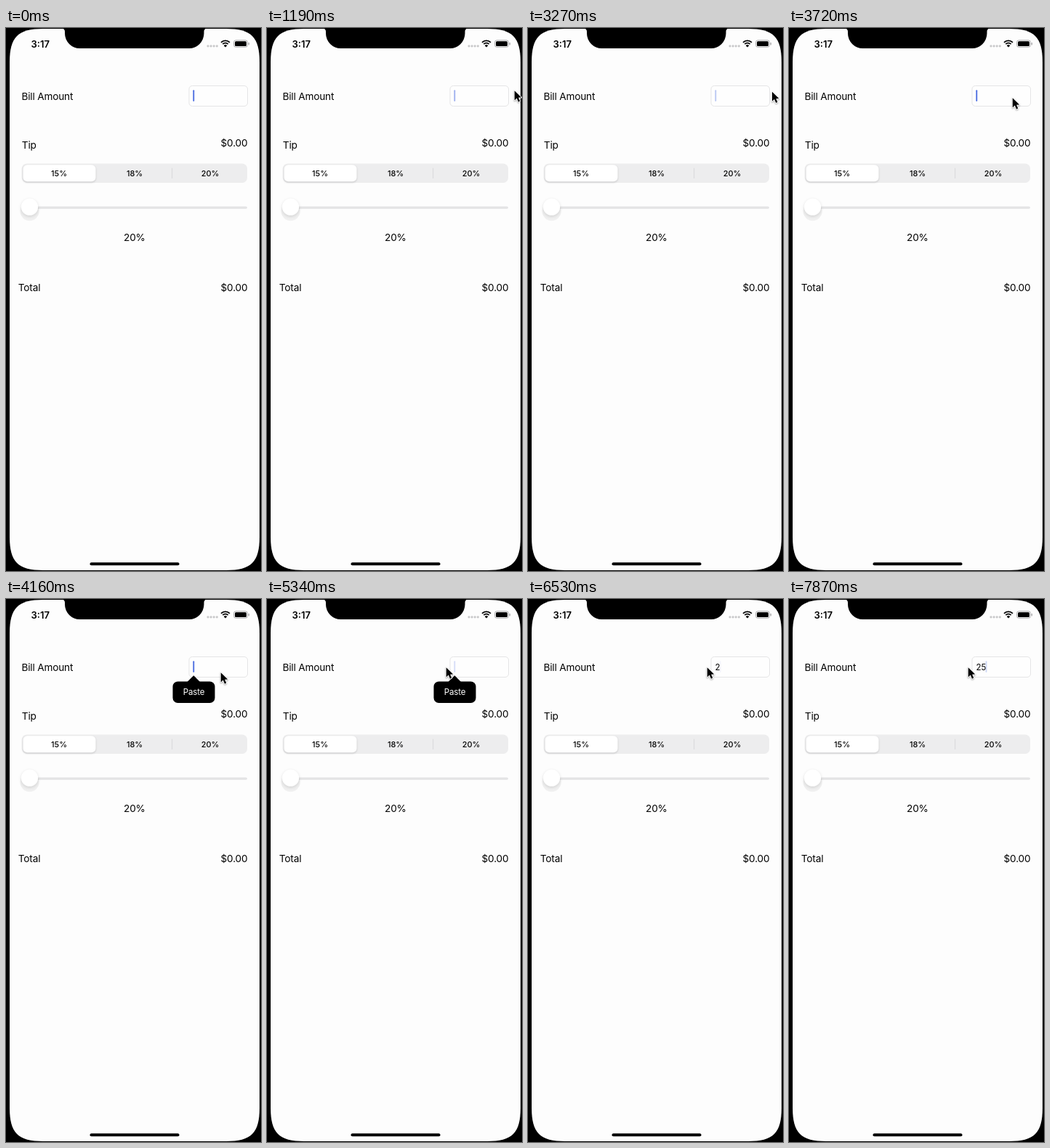
These frames come from a looping animation (351 by 747 pixels, 8000 ms). An HTML page with a canvas:

```html
<!DOCTYPE html>
<html lang="en">
<head>
<meta charset="utf-8">
<title>Tip calculator</title>
<style>
html, body { margin: 0; width: 100%; height: 100%; overflow: hidden; background: #000; }
canvas { display: block; width: 351px; height: 747px; }
</style>
</head>
<body>
<canvas id="stage"></canvas>
<script>
const W = 351, H = 747, LOOP = 8000;
const TICK = 148.3;
const MENU_OPEN = 3940, MENU_CLOSE = 5870;
const KEYS = [{ time: 5860, text: '2' }, { time: 7260, text: '25' }];
const BLINK = { period: 1015, hold: 500, firstFade: 152 };
const POINTER_SHOWN = 590;
const POINTER_START = { x: 340, y: 86 };
const MOVES = [
  { from: 3120, to: 3720, x: 307, y: 96 },
  { from: 3870, to: 4160, x: 295, y: 101 },
  { from: 4600, to: 5190, x: 246, y: 94 }
];

const canvas = document.getElementById('stage');
const ctx = canvas.getContext('2d');
const ratio = window.devicePixelRatio || 1;
canvas.width = W * ratio;
canvas.height = H * ratio;

const clamp = v => Math.min(1, Math.max(0, v));
const progress = (time, from, to) => clamp((time - from) / (to - from));
const smooth = p => p * p * (3 - 2 * p);

function box(x, y, w, h, r, fill) {
  ctx.beginPath();
  ctx.roundRect(x, y, w, h, r);
  ctx.fillStyle = fill;
  ctx.fill();
}

function disc(x, y, r, fill) {
  ctx.beginPath();
  ctx.arc(x, y, r, 0, Math.PI * 2);
  ctx.fillStyle = fill;
  ctx.fill();
}

function shadow(color, blur, dy) {
  ctx.shadowColor = color;
  ctx.shadowBlur = blur * ratio;
  ctx.shadowOffsetY = dy * ratio;
}

function label(text, x, y, { size = 13.6, weight = 400, align = 'left', color = '#000', spacing = -.012 } = {}) {
  ctx.font = `${weight} ${size}px Inter, sans-serif`;
  ctx.letterSpacing = `${size * spacing}px`;
  ctx.textAlign = align;
  ctx.fillStyle = color;
  ctx.fillText(text, x, y);
}

function polygon(points) {
  ctx.beginPath();
  points.forEach(([x, y]) => ctx.lineTo(x, y));
  ctx.closePath();
}

// Rectangle whose corners ease in gradually instead of being circular.
function smoothBox(left, top, right, bottom, reach, fill) {
  const c = reach / 4;
  ctx.beginPath();
  ctx.moveTo(left, top + reach);
  ctx.bezierCurveTo(left, top + c, left + c, top, left + reach, top);
  ctx.lineTo(right - reach, top);
  ctx.bezierCurveTo(right - c, top, right, top + c, right, top + reach);
  ctx.lineTo(right, bottom - reach);
  ctx.bezierCurveTo(right, bottom - c, right - c, bottom, right - reach, bottom);
  ctx.lineTo(left + reach, bottom);
  ctx.bezierCurveTo(left + c, bottom, left, bottom - c, left, bottom - reach);
  ctx.fillStyle = fill;
  ctx.fill();
}

function drawNotch(left, right, bottom) {
  ctx.beginPath();
  ctx.moveTo(left - 5, 0);
  ctx.arcTo(left, 1, left, 7, 5);
  ctx.arcTo(left, bottom, left + 21, bottom, 20.5);
  ctx.arcTo(right, bottom, right, 7, 20.5);
  ctx.arcTo(right, 1, right + 5, 0, 5);
  ctx.lineTo(right + 5, 0);
  ctx.fillStyle = '#000';
  ctx.fill();
}

function drawPhone() {
  ctx.fillStyle = '#000';
  ctx.fillRect(0, 0, W, H);
  smoothBox(5, 1, 349, 746, 46, '#fdfdfd');
  drawNotch(81, 272.5, 28);
  box(115.5, 735.2, 123, 4.1, 2, '#000');
}

function drawStatus() {
  label('3:17', 34.5, 26.5, { size: 13, weight: 600, spacing: 0 });
  for (let i = 0; i < 4; i++) disc(278 + i * 4.1, 24.8, 1.6, '#c8c8ca');

  ctx.strokeStyle = '#000';
  ctx.lineWidth = 1.9;
  for (const r of [8.4, 5.2]) {
    ctx.beginPath();
    ctx.arc(302, 25.8, r, -Math.PI * .75, -Math.PI * .25);
    ctx.stroke();
  }
  ctx.beginPath();
  ctx.moveTo(302, 26.4);
  ctx.arc(302, 26.4, 3.2, -Math.PI * .75, -Math.PI * .25);
  ctx.fillStyle = '#000';
  ctx.fill();

  ctx.beginPath();
  ctx.roundRect(313.5, 16.9, 19, 9.4, 2.8);
  ctx.strokeStyle = '#a4a4a6';
  ctx.lineWidth = .9;
  ctx.stroke();
  box(315, 18.3, 16, 6.6, 1.5, '#000');
  box(333.6, 20, 1.3, 3.4, .7, '#a4a4a6');
}

function drawForm() {
  label('Bill Amount', 21.5, 98.6);
  label('Tip', 21.8, 165.9);
  label('Total', 16.8, 362.1);
  label('$0.00', 332.4, 162.8, { align: 'right' });
  label('$0.00', 332.4, 362.1, { align: 'right' });
  label('20%', 176.9, 293.1, { align: 'center' });

  box(252, 79.5, 80.5, 28, 4.5, '#fefefe');
  ctx.strokeStyle = '#e5e5e6';
  ctx.lineWidth = 1;
  ctx.stroke();

  box(21.7, 186.5, 310.3, 26.5, 7, '#ededee');
  ctx.save();
  shadow('rgba(0,0,0,.16)', 3, 1.2);
  box(23.5, 188.2, 100, 23.1, 5.8, '#fff');
  ctx.restore();
  box(228.1, 192.5, 1, 14.5, .5, '#d8d8da');
  ['15%', '18%', '20%'].forEach((text, i) =>
    label(text, 73 + i * 104, 203.5, { size: 10.9, weight: 500, align: 'center', spacing: 0 }));

  box(22, 245.4, 310, 3.3, 1.65, '#e4e4e5');
  disc(32.5, 252.3, 13, 'rgba(0,0,0,.05)');
  ctx.save();
  shadow('rgba(0,0,0,.13)', 4, 1.5);
  disc(32.5, 246.2, 11.6, '#fff');
  ctx.restore();
}

function caretOpacity(time, lastKey) {
  const fadeStart = lastKey ? lastKey.time + BLINK.hold : BLINK.firstFade;
  if (time < fadeStart) return 1;
  const age = (time - fadeStart) % BLINK.period;
  return age < 300 ? clamp(.6 - age / 300) : progress(age, 320, 465);
}

function drawEntry(time) {
  const lastKey = KEYS.filter(key => key.time <= time).pop();
  const text = lastKey ? lastKey.text : '';
  label(text, 257.6, 97.5, { size: 11.5, spacing: -.01 });
  ctx.globalAlpha = caretOpacity(time, lastKey);
  box(257.4 + text.length * 6.6, 85.3, 1.8, 15.6, .9, '#4568df');
  ctx.globalAlpha = 1;
}

function drawMenu(time) {
  const opacity = progress(time, MENU_OPEN, MENU_OPEN + 150) - progress(time, MENU_CLOSE, MENU_CLOSE + 150);
  if (opacity <= 0) return;
  ctx.globalAlpha = opacity;
  box(229.5, 113.5, 58, 29.5, 7, '#000');
  polygon([[249.5, 114], [258.3, 105.3], [267, 114]]);
  ctx.fill();
  label('Paste', 258.5, 132.3, { size: 11.5, align: 'center', color: '#fff' });
  ctx.globalAlpha = 1;
}

function drawPointer(time) {
  if (time < POINTER_SHOWN) return;
  let { x, y } = POINTER_START;
  for (const move of MOVES) {
    const p = smooth(progress(time, move.from, move.to));
    x += (move.x - x) * p;
    y += (move.y - y) * p;
  }
  ctx.save();
  ctx.translate(x + .7, y + .2);
  ctx.scale(.93, .93);
  polygon([[0, 0], [0, 14.2], [3.3, 11.2], [5.7, 16.6], [8.1, 15.5], [5.8, 10.3], [10.2, 10.1]]);
  ctx.lineJoin = 'round';
  ctx.lineWidth = 2;
  ctx.strokeStyle = '#fff';
  shadow('rgba(0,0,0,.35)', 2, 1);
  ctx.stroke();
  shadow('transparent', 0, 0);
  ctx.fillStyle = '#000';
  ctx.fill();
  ctx.restore();
}

function draw(elapsed) {
  const time = Math.floor(elapsed / TICK + .025) * TICK;
  ctx.setTransform(ratio, 0, 0, ratio, 0, 0);
  drawPhone();
  drawStatus();
  drawForm();
  drawEntry(time);
  drawMenu(time);
  drawPointer(time);
}

const start = performance.now();
function tick() {
  draw((performance.now() - start) % LOOP);
  requestAnimationFrame(tick);
}
tick();
</script>
</body>
</html>
```
